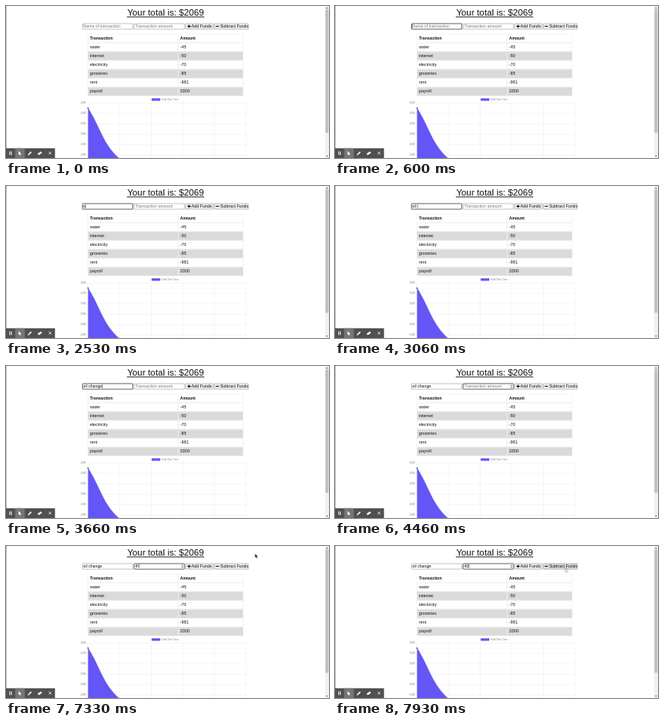
An HTML page for the animation above (8 s loop, 404 by 190 pixels).

```html
<!DOCTYPE html>
<html lang="en">
<head>
<meta charset="utf-8">
<title>Budget tracker</title>
<style>
html, body { margin: 0; width: 100%; height: 100%; overflow: hidden; background: #fff; }
svg { display: block; width: 100vw; height: 100vh; }
text { font-family: "Liberation Sans", Arial, sans-serif; font-size: 5.3px; fill: #111; white-space: pre; }
.hint { fill: #787878; }
.axis { font-size: 3px; fill: #808080; }
.field { fill: #fff; stroke: #858585; stroke-width: .5; }
.field.on { stroke: #222; stroke-width: .7; }
.btn { fill: #efefef; stroke: #858585; stroke-width: .5; }
.btn.over { fill: #dcdcdc; }
</style>
</head>
<body>
<svg id="stage" viewBox="0 0 404 190" preserveAspectRatio="none">
  <rect width="404" height="190" fill="#fff"/>
  <rect width=".5" height="190" fill="#777"/>
  <rect x="399" width="5" height="190" fill="#f1f1f1"/>
  <rect x="399.5" y="4.5" width="3.9" height="154" fill="#c1c1c1"/>
  <path d="M400.2 3.2h2.6l-1.3-1.6zM400.2 187h2.6l-1.3 1.6z" fill="#555"/>

  <text x="199.6" y="12.3" text-anchor="middle" style="font-size:11.25px">Your total is: $2069</text>
  <rect x="151.2" y="13.3" width="96.8" height=".9" fill="#111"/>

  <rect id="nameBox" class="field" x="95.7" y="22" width="63" height="7" rx=".6"/>
  <text id="name" x="96.5" y="27.3" style="font-size:5.2px"></text>
  <rect id="amountBox" class="field" x="160.2" y="22" width="63" height="7" rx=".6"/>
  <text id="amount" x="161.5" y="27.3"></text>
  <path id="spin" d="M219.4 25l1.2-1.5 1.2 1.5zM219.4 26.2l1.2 1.5 1.2-1.5z" fill="#555"/>
  <rect id="caret" y="23" width=".45" height="5.2" fill="#222"/>

  <rect class="btn" x="224.7" y="22" width="34.5" height="7" rx=".8"/>
  <path d="M227 25.4h4M229 23.4v4" stroke="#111" stroke-width="1.1"/>
  <text x="231.8" y="27.3">Add Funds</text>
  <rect id="subtract" class="btn" x="260.6" y="22" width="42.6" height="7" rx=".8"/>
  <path d="M262.4 25.4h4" stroke="#111" stroke-width="1.1"/>
  <text x="267.9" y="27.3" style="font-size:5.2px">Subtract Funds</text>

  <g id="table"></g>
  <g id="chart"></g>

  <g id="toolbar">
    <rect y="177.8" width="61.3" height="12.2" fill="#505050"/>
    <rect x="11.5" y="177.8" width="12" height="12.2" fill="#767676"/>
    <path d="M4.7 181.7v4.6M6.7 181.7v4.6" stroke="#fff" stroke-width="1"/>
    <path d="M15.7 181.2v5l1.2-1 .9 1.8.8-.4-.8-1.7h1.5z" fill="#fff"/>
    <path d="M28.2 185.8l3.4-3.4" stroke="#fff" stroke-width="1.5"/>
    <path d="M27.3 186.7l.5-1.6 1.1 1.1z" fill="#fff"/>
    <path d="M40.2 185.4l4.2-2.6" stroke="#fff" stroke-width="2.3"/>
    <path d="M53.5 182.3l3.2 3.2M56.7 182.3l-3.2 3.2" stroke="#fff" stroke-width=".8"/>
  </g>

  <g id="pointer">
    <path id="arrow" d="M0 0v5.4l1.3-1.2.9 2 .9-.4-.9-1.9h1.8z" fill="#111" stroke="#fff" stroke-width=".4"/>
    <path id="hand" d="M-.5.3q.5-.6 1 0v2l1.5.4q.6.2.5.9l-.4 2.1h-2.5L-1.7 3.7q.2-.7 1.2.2z" fill="#fff" stroke="#444" stroke-width=".35"/>
  </g>
</svg>
<script>
const LOOP = 8000;
const $ = id => document.getElementById(id);

function add(parent, tag, attrs, text) {
  const el = document.createElementNS("http://www.w3.org/2000/svg", tag);
  for (const key in attrs) el.setAttribute(key, attrs[key]);
  if (text !== undefined) el.textContent = text;
  parent.append(el);
  return el;
}

function buildTable() {
  const g = $("table");
  const rows = [["Transaction", "Amount"], ["water", -45], ["internet", -50],
    ["electricity", -70], ["groceries", -85], ["rent", -981], ["payroll", 3300]];
  rows.forEach((row, i) => {
    const y = 34.7 + i * 11.1;
    const fill = i && i % 2 === 0 ? "#dadada" : "#fff";
    row.forEach((label, col) => {
      const x = col ? 215.5 : 102.7;
      add(g, "rect", { x, y: y + .3, width: col ? 81 : 112.2, height: 10.5, fill,
        stroke: "#e4e4e4", "stroke-width": .4 });
      add(g, "text", { x: x + 2.3, y: y + 7.1, style: i ? "" : "font-weight:bold;font-size:5.1px" }, label);
    });
  });
}

function buildChart() {
  const g = $("chart");
  const left = 102.6, top = 121.2, stepX = 39.5, stepY = 13;
  add(g, "rect", { x: 182.2, y: 115.4, width: 10.8, height: 3.1, fill: "#6455f6" });
  add(g, "text", { class: "axis", x: 194.6, y: 118 }, "Total Over Time");
  for (let i = 0; i < 6; i++) {
    const x = left + i * stepX, y = top + i * stepY;
    add(g, "path", { d: `M${x} ${top}V190M${left - 2} ${y}H300.1`, stroke: "#e8e8e8", "stroke-width": .5 });
    add(g, "text", { class: "axis", x: 100, y: y + 1, "text-anchor": "end" }, 3400 - i * 200);
  }
  const curve = "M102.6 127.6C118.4 153 121.4 173.5 142 191";
  add(g, "path", { d: curve + "H102.6z", fill: "#6455f6" });
  add(g, "path", { d: curve, fill: "none", stroke: "#5a4edb", "stroke-width": .5 });
  add(g, "circle", { cx: 102.6, cy: 127.6, r: .9, fill: "#444" });
}

// Keystrokes: [time, number of characters shown]
const nameKeys = [[2530, 1], [2800, 2], [3000, 3], [3060, 4], [3200, 5], [3330, 6], [3400, 7], [3530, 9], [3660, 10]];
const amountKeys = [[6260, 1], [6660, 2]];
// Times at which the caret turns on or off, starting with on
const blinks = [460, 1030, 1500, 2060, 2530, 4430, 5000, 5560, 6100, 7200, 7700];

function typed(text, keys, t) {
  const last = keys.filter(k => k[0] <= t).pop();
  return text.slice(0, last ? last[1] : 0);
}

function setField(id, value, hint) {
  const el = $(id);
  const text = value || hint;
  if (el.textContent !== text) el.textContent = text;
  el.setAttribute("class", value ? "" : "hint");
  return value ? el.getComputedTextLength() : 0;
}

function show(id, visible) {
  $(id).setAttribute("visibility", visible ? "visible" : "hidden");
}

function draw(t) {
  const inName = t >= 460 && t < 3930, inAmount = t >= 3930;
  const nameWidth = setField("name", typed("oil change", nameKeys, t), "Name of transaction");
  const amountWidth = setField("amount", typed("40", amountKeys, t), "Transaction amount");
  $("nameBox").classList.toggle("on", inName);
  $("amountBox").classList.toggle("on", inAmount);
  show("spin", inAmount);

  show("caret", blinks.filter(b => b <= t).length % 2 === 1);
  $("caret").setAttribute("x", inAmount ? 161.5 + amountWidth : 96.5 + nameWidth);

  const p = Math.min(1, Math.max(0, (t - 7230) / 680));
  const k = 1 - (1 - p) ** 2;
  const x = 320 - 31.2 * k, y = 3 + 23.8 * k;
  const over = x < 303.2 && y > 22;
  show("pointer", t >= 7230);
  show("arrow", t >= 7230 && !over);
  show("hand", over);
  $("pointer").setAttribute("transform", `translate(${x} ${y})`);
  $("subtract").classList.toggle("over", over);
}

buildTable();
buildChart();
const start = performance.now();
function tick() {
  draw((performance.now() - start) % LOOP);
  requestAnimationFrame(tick);
}
tick();
</script>
</body>
</html>
```
